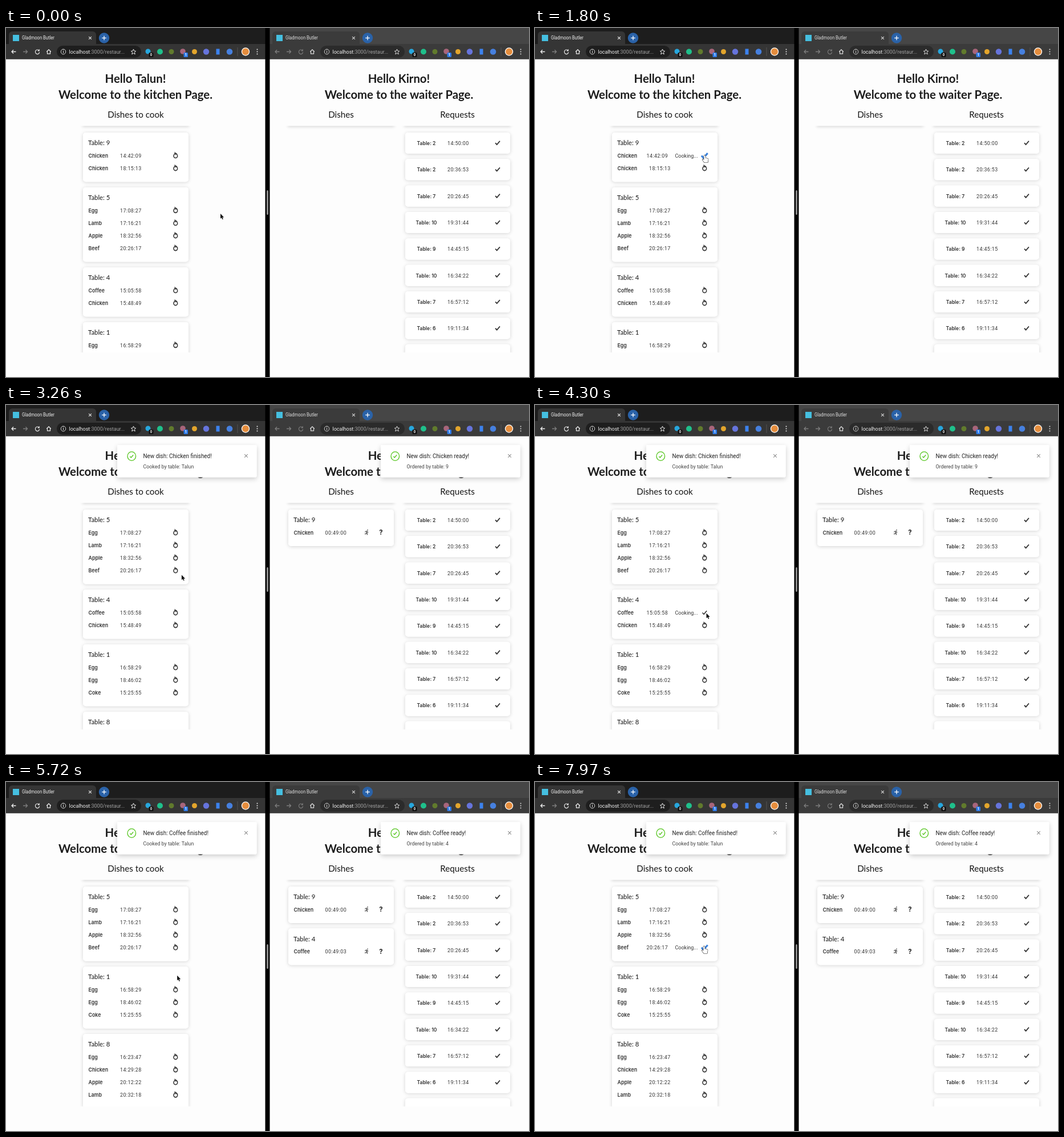
Animation, 917 px wide and 611 px high, one loop 8 s. Source, as an HTML page with a canvas:

```html
<!DOCTYPE html>
<html lang="en">
<head>
<meta charset="utf-8">
<title>Kitchen and waiter pages</title>
<style>
  html, body { margin: 0; width: 100%; height: 100%; overflow: hidden; background: #fdfdfd; }
  canvas { display: block; }
</style>
</head>
<body>
<canvas id="stage" width="917" height="611"></canvas>
<script>
const ctx = document.getElementById('stage').getContext('2d');
const LOOP = 8000, WINDOW_X = 462, ICON_X = 297, PAGE = '#fdfdfd', INK = '#343434', BLUE = '#3880dc';
const LATO = 'Lato, sans-serif', INTER = 'Inter, sans-serif', ROBOTO = 'Roboto, sans-serif';
const STRETCH = 1.066; // the 16:10 screen is shown at 3:2, so glyphs are a little tall

const tables = {
  9: ['Chicken 14:42:09', 'Chicken 18:15:13'],
  5: ['Egg 17:08:27', 'Lamb 17:16:21', 'Apple 18:32:56', 'Beef 20:26:17'],
  4: ['Coffee 15:05:58', 'Chicken 15:48:49'],
  1: ['Egg 16:58:29', 'Egg 18:46:02', 'Coke 15:25:55'],
  8: ['Egg 16:23:47', 'Chicken 14:29:28', 'Apple 20:12:22', 'Lamb 20:32:18'],
};
const requests = ['2 14:50:00', '2 20:36:53', '7 20:26:45', '10 19:31:44', '9 14:45:15',
  '10 16:34:22', '7 16:57:12', '6 19:11:34'];

// Orders: when cooking starts, when the dish is served, when its toasts come and go.
const orders = [
  { table: 9, row: 0, dish: 'Chicken', time: '00:49:00', cook: 1500, serve: 2140, toast: 2191, leave: [5247, 5232] },
  { table: 4, row: 0, dish: 'Coffee', time: '00:49:03', cook: 4180, serve: 4980, toast: 5025, leave: [9e9, 9e9] },
  { table: 5, row: 3, dish: 'Beef', cook: 7450, serve: 9e9, toast: 9e9 },
];
const tooltips = [[223, 1080, 1500], [223, 2460, 2640], [363, 3900, 4180], [363, 5430, 5640], [290, 6420, 6860]];
const pointerPath = [[50, 376, 325], [840, 297.5, 223], [2550, 297.5, 223], [3300, 308, 298], [3400, 308, 298],
  [3820, 300.5, 364.5], [5480, 300.5, 364.5], [5840, 300, 330], [6000, 300, 330], [6500, 296, 267],
  [6740, 296, 267], [6900, 296.5, 287.5]];

const shapes = {
  flame: new Path2D('M10 2c2 2 2.500 4 2.500 6 1-.5 2-1.500 2.500-3 3 2 5 5 5 9a8 8 0 0 1-16 0c0-3 1.500-5 3-6.500 1-1.500 3-3 3-5.500z'),
  check: new Path2D('M3 13l6 6L21 6'),
  runner: new Path2D('M6 11L9.500 7.500H14.500L12 14L16 17L14.500 22M11.500 14.500L9.500 18H4.500M14 8L16 11.500H20M17.500 3a.8.8 0 1 1-1.600 0a.8.8 0 1 1 1.600 0'),
  hand: new Path2D('M-1.2 .8C-1.2-.6 1.2-.6 1.2 .8V4.6L5.2 5.6C6.4 6 6.4 7 6.2 8L5.4 12.4H-.6L-3.8 8C-4.4 7-3 6.2-2.2 7L-1.2 8Z'),
  arrow: new Path2D('M0 0V8.8L2 7L3.400 10.200L4.800 9.600L3.500 6.500H6.200Z'),
  reload: new Path2D('M19 7a9 9 0 1 0 2 7M20 2v6h-6'),
  home: new Path2D('M3 12L12 4l9 8M6 10v10h12V10'),
  back: new Path2D('M21 12H4M11 5l-7 7 7 7'),
  star: new Path2D('M12 2l3 7 7 .6-5.4 4.8L18.5 22 12 17.7 5.5 22l1.9-7.6L2 9.6 9 9z'),
};

const clamp = v => Math.max(0, Math.min(1, v));
const smooth = v => v * v * (3 - 2 * v);
const outQuart = v => 1 - (1 - clamp(v)) ** 4;

// cubic-bezier(.645, .045, .355, 1)
function easeInOut(v) {
  const curve = (a, b, u) => 3 * (1 - u) ** 2 * u * a + 3 * (1 - u) * u * u * b + u ** 3;
  let low = 0, high = 1;
  v = clamp(v);
  for (let i = 0; i < 20; i++) {
    const mid = (low + high) / 2;
    if (curve(.645, .355, mid) < v) low = mid; else high = mid;
  }
  return v === 0 ? 0 : curve(.045, 1, high);
}

// y is the middle of the capital letters
function text(string, x, y, size, family, color = INK, weight = 400, align = 'left') {
  ctx.save();
  ctx.translate(x, y);
  ctx.scale(1, STRETCH);
  ctx.font = `${weight} ${size}px ${family}`;
  ctx.textAlign = align;
  ctx.fillStyle = color;
  ctx.fillText(string, 0, size * .36);
  ctx.restore();
}

function clock(time, x, y) {
  ctx.letterSpacing = '0.42px';
  text(time, x, y, 8.9, ROBOTO);
  ctx.letterSpacing = '0px';
}

function box(x, y, w, h, color, radius = 0) {
  ctx.fillStyle = color;
  ctx.beginPath();
  ctx.roundRect(x, y, w, h, radius);
  ctx.fill();
}

function disc(x, y, r, color) {
  ctx.fillStyle = color;
  ctx.beginPath();
  ctx.arc(x, y, r, 0, 7);
  ctx.fill();
}

function ring(x, y, r, color, width = 1) {
  ctx.strokeStyle = color;
  ctx.lineWidth = width;
  ctx.beginPath();
  ctx.ellipse(x, y, r, r * STRETCH, 0, 0, 7);
  ctx.stroke();
}

function icon(name, x, y, scale, color, width, flip = 1) {
  ctx.save();
  ctx.translate(x, y);
  ctx.scale(scale * flip, scale * STRETCH);
  ctx.translate(-12, -12);
  ctx.strokeStyle = color;
  ctx.lineWidth = width;
  ctx.stroke(shapes[name]);
  ctx.restore();
}

function cross(x, y, r, color, turn = Math.PI / 4, width = 1) {
  ctx.save();
  ctx.translate(x, y);
  ctx.rotate(turn);
  box(-r, -width / 2, 2 * r, width, color);
  box(-width / 2, -r, width, 2 * r, color);
  ctx.restore();
}

// White box whose shadow lies only outside it, so that it can fade cleanly
function panel(x, y, w, h, radius, blur, offset, alpha) {
  ctx.save();
  ctx.beginPath();
  ctx.rect(-50, 0, 600, 700);
  ctx.roundRect(x, y, w, h, radius);
  ctx.clip('evenodd');
  ctx.shadowColor = `rgba(0,0,0,${alpha})`;
  ctx.shadowBlur = blur;
  ctx.shadowOffsetY = offset;
  box(x, y, w, h, '#fff', radius);
  ctx.restore();
  box(x, y, w, h, '#fff', radius);
}

const card = (x, y, w, h) => panel(x, y, w, h, 5, 6, 1, .17);

function columnHeader(title, x, w) {
  panel(x + 5, 150, w - 10, 21, 0, 5, 2, .16);
  box(x - 4, 132, w + 8, 39.5, PAGE);
  text(title, x + w / 2, 151, 15.2, LATO, '#151515', 400, 'center');
}

function browser(active) {
  const bar = active ? '#353535' : '#3b3b3b', ink = active ? '#eee' : '#ddd', dim = '#7d7d7d';
  const nav = active ? ink : dim;
  box(0, 0, 455, 28, active ? '#1d1d1d' : '#464646');
  box(5, 6, 153, 30, bar, 6);
  box(0, 28, 455, 26.8, bar);
  box(12, 12, 11, 11, '#45bfe0');
  text('Gladmoon Butler', 28, 17.5, 7.64, ROBOTO, ink);
  cross(147.5, 17.5, 3.4, ink);
  disc(172, 17.5, 9.2, '#2a62a8');
  cross(172, 17.5, 3.8, '#fff', 0, 1.3);

  icon('back', 13.5, 41.5, .44, nav, 2.8);
  icon('back', 34, 41.5, .44, dim, 2.8, -1);
  icon('reload', 55, 41.5, .4, nav, 2.8);
  icon('home', 75, 41.5, .42, ink, 2.8);
  box(89, 31, 148, 21, active ? '#1e1e1e' : '#2b2b2b', 10.5);
  ring(100.5, 41.5, 4.2, ink, .9);
  text('i', 100.5, 41.5, 6.5, ROBOTO, ink, 700, 'center');
  ctx.font = `9px ${ROBOTO}`;
  const hostWidth = ctx.measureText('localhost').width;
  text('localhost', 110.5, 41.5, 9, ROBOTO, '#f0f0f0');
  text(':3000/restaur...', 110.5 + hostWidth, 41.5, 9, ROBOTO, '#a0a0a0');
  icon('star', 223.5, 41.5, .42, ink, 2.2);

  disc(249, 41, 4.5, '#27a7de');
  box(250.5, 43, 8, 8, '#111', 1.5);
  text('0', 254.5, 47, 6, ROBOTO, '#fff', 700, 'center');
  disc(270, 41.5, 5, '#1fc08b');
  disc(290, 41.5, 4.5, '#617b2d');
  disc(310, 41, 4.8, '#a8657b');
  box(311.5, 43, 7.5, 8, '#2f7be8', 1.5);
  text('1', 315.2, 47, 6, ROBOTO, '#fff', 700, 'center');
  disc(330.5, 41.5, 4.5, '#e3a52c');
  disc(351, 41.5, 5.2, '#6674dc');
  box(368.5, 36.5, 6, 10, '#3c82ee');
  disc(392, 41.5, 5.3, '#4680df');
  box(405.5, 34, 1, 15, '#555');
  disc(420, 41.5, 7.2, '#fff');
  disc(420, 41.5, 5.9, '#e58d3d');
  for (let i = -1; i < 2; i++) disc(440.5, 41.5 + i * 4, 1, ink);
}

function page(active, name, place) {
  box(0, 0, 455, 611, PAGE);
  browser(active);
  text(`Hello ${name}!`, 227, 88.5, 20.35, LATO, '#1c1c1c', 700, 'center');
  text(`Welcome to the ${place} Page.`, 227, 116.5, 20.35, LATO, '#1c1c1c', 700, 'center');
}

function pointerAt(t) {
  const i = pointerPath.findIndex(p => p[0] > t);
  if (i === 0) return pointerPath[0].slice(1);
  if (i < 0) return pointerPath.at(-1).slice(1);
  const [t0, x0, y0] = pointerPath[i - 1], [t1, x1, y1] = pointerPath[i];
  const k = smooth((t - t0) / (t1 - t0));
  return [x0 + (x1 - x0) * k, y0 + (y1 - y0) * k];
}

function clipList() {
  ctx.beginPath();
  ctx.rect(0, 172, 455, 396);
  ctx.clip();
}

function kitchenList(t, pointer) {
  const gone = orders.filter(o => t >= o.serve).map(o => o.table);
  const settled = !orders.some(o => [o.cook, o.serve].some(c => t >= c && t < c + 150));
  const covered = tooltips.some(([y, from, to]) => t >= from && t < to && pointer[1] < y - 16 && pointer[1] > y - 40);
  let hovering = false, top = 183;
  ctx.save();
  clipList();
  for (const table of [9, 5, 4, 1, 8].filter(n => !gone.includes(n))) {
    const rows = tables[table], height = 42 + 22.1 * rows.length;
    card(135, top, 185, height);
    text(`Table: ${table}`, 144, top + 18, 11.35, LATO, '#151515');
    rows.forEach((line, i) => {
      const [dish, time] = line.split(' '), y = top + 40.3 + 22.1 * i;
      const cooking = orders.some(o => o.table === table && o.row === i && t >= o.cook);
      const hover = settled && !covered && Math.abs(pointer[0] - ICON_X) < 6 && Math.abs(pointer[1] - y) < 6;
      hovering ||= hover;
      text(dish, 144.5, y, 8.8, INTER, INK, 600);
      clock(time, cooking ? 195.5 : 200, y);
      if (cooking) text('Cooking...', 245.5, y, 9, ROBOTO);
      icon(cooking ? 'check' : 'flame', ICON_X + .3, y - .3, hover ? .6 : .42, hover ? BLUE : INK, hover ? 5 : 3.6);
    });
    top += height + 9.7;
  }
  ctx.restore();
  return hovering;
}

function dishList(t) {
  let top = 183;
  for (const order of orders.filter(o => t >= o.serve)) {
    const shown = outQuart((t - order.serve) / 450), rowShown = outQuart((t - order.serve - 50) / 450);
    ctx.save();
    ctx.globalAlpha = shown;
    ctx.translate(19 * (shown - 1), 0);
    card(33, top, 185, 64);
    text(`Table: ${order.table}`, 42, top + 18, 11.35, LATO, '#151515');
    ctx.globalAlpha = shown * rowShown;
    ctx.translate(19 * (rowShown - shown), 0);
    const y = top + 40.3;
    text(order.dish, 42.5, y, 8.8, INTER, INK, 600);
    clock(order.time, 97.5, y);
    icon('runner', 170, y - .3, .42, INK, 2.4);
    text('?', 195.5, y - .3, 11, INTER, INK, 800, 'center');
    ctx.restore();
    top += 73.3;
  }
}

function requestList() {
  for (let i = 0; i < 9; i++) {
    const y = 201.5 + 46.35 * i;
    card(238, y - 18.5, 184, 37);
    if (!requests[i]) continue;
    const [table, time] = requests[i].split(' ');
    text(`Table: ${table}`, 275, y, 8.6, INTER, INK, 600, 'center');
    clock(time, 312, y);
    icon('check', 400, y - .7, .44, INK, 4);
  }
}

function toasts(t, side, describe) {
  let top = 70;
  for (const order of orders) {
    if (t < order.toast) continue;
    const enter = easeInOut((t - order.toast) / 240), leave = easeInOut((t - order.leave[side]) / 200);
    if (leave >= 1) continue;
    const height = Math.min(56.5 - 20.4 * leave, 95.5 * (1 - leave)), pad = 10.2 * (1 - leave);
    const [title, detail] = describe(order);
    ctx.save();
    ctx.translate(244 * (1 - enter), 0);
    ctx.globalAlpha = enter * (1 - leave);
    panel(195, top, 244.5, height, 2, 9, 3, .2);
    ctx.beginPath();
    ctx.rect(195, top, 244.5, height);
    ctx.clip();
    const y = top + pad + 9.4;
    ring(220.3, y, 7.3, '#52c41a', 1.3);
    icon('check', 220.3, y, .32, '#52c41a', 4);
    text(title, 240.5, y, 9.9, ROBOTO, '#222');
    text(detail, 240.5, y + 18.4, 8.86, ROBOTO, '#444');
    cross(421, y - .6, 4, '#888', Math.PI / 4, .9);
    ctx.restore();
    top += height + pad;
  }
}

function tooltip(t) {
  for (const [y, from, to] of tooltips) {
    if (t < from || t >= to) continue;
    ctx.save();
    ctx.globalAlpha = clamp((t - from) / 100);
    box(277, y - 39, 41.5, 22.5, '#363636', 2);
    ctx.fill(new Path2D(`M294 ${y - 17}h7l-3.5 3.5z`));
    text('cooking', 297.6, y - 27.8, 9, ROBOTO, '#fff', 400, 'center');
    ctx.restore();
  }
}

function inWindow(x, draw) {
  ctx.save();
  ctx.translate(x, 0);
  ctx.beginPath();
  ctx.rect(0, 0, 455, 611);
  ctx.clip();
  draw();
  ctx.restore();
}

function drawPointer([x, y], hand) {
  const shape = hand ? shapes.hand : shapes.arrow;
  ctx.save();
  ctx.translate(x, y);
  ctx.lineJoin = 'round';
  ctx.strokeStyle = hand ? '#111' : '#fff';
  ctx.lineWidth = hand ? 1.1 : 1.4;
  ctx.stroke(shape);
  ctx.fillStyle = hand ? '#fff' : '#111';
  ctx.fill(shape);
  ctx.restore();
}

function render(t) {
  const pointer = pointerAt(t);
  let hand = false;
  inWindow(0, () => {
    page(true, 'Talun', 'kitchen');
    columnHeader('Dishes to cook', 129, 197);
    hand = kitchenList(t, pointer);
    toasts(t, 0, o => [`New dish: ${o.dish} finished!`, 'Cooked by table: Talun']);
    tooltip(t);
  });
  inWindow(WINDOW_X, () => {
    page(false, 'Kirno', 'waiter');
    columnHeader('Dishes', 27, 197);
    columnHeader('Requests', 231, 197);
    ctx.save();
    clipList();
    dishList(t);
    requestList();
    ctx.restore();
    toasts(t, 1, o => [`New dish: ${o.dish} ready!`, `Ordered by table: ${o.table}`]);
  });
  box(454.5, 0, 8, 611, '#000');
  box(457, 284, 3, 43, '#8a8a8a', 1.5);
  drawPointer(pointer, hand);
}

const start = performance.now();
function tick() {
  render((performance.now() - start) % LOOP);
  requestAnimationFrame(tick);
}
tick();
</script>
</body>
</html>
```
